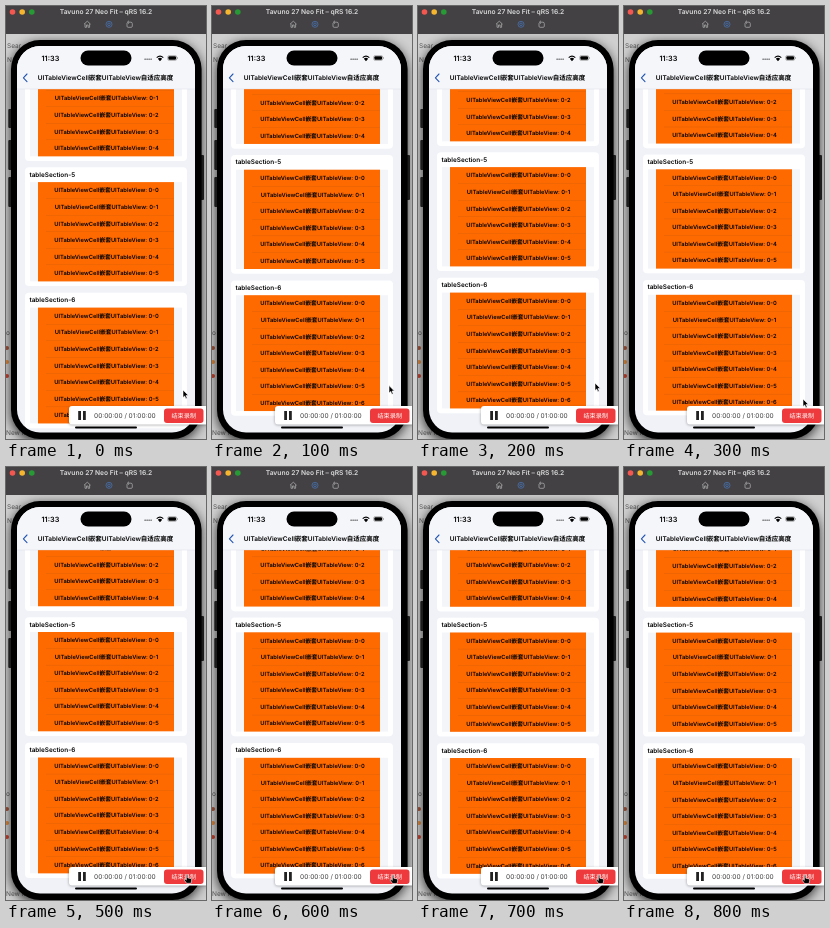
Recreate the animation shown at these times as an HTML page. Size 200 px wide and 433 px high, loop 0.9 s.

```html
<!DOCTYPE html>
<html lang="zh-CN">
<head>
<meta charset="utf-8">
<title>Nested table</title>
<style>
html, body { margin: 0; width: 100%; height: 100%; overflow: hidden; background: #d3d3d3; }
svg { display: block; width: 100%; height: 100%; }
text { font: 600 5.75px Inter, "Noto Sans CJK SC", "Noto Sans CJK", sans-serif; text-rendering: geometricPrecision; }
.mid { text-anchor: middle; }
.side text { font-weight: 400; font-size: 6.5px; fill: #555; }
</style>
</head>
<body>
<svg viewBox="0 0 200 433" preserveAspectRatio="none">
  <defs>
    <clipPath id="screen"><rect x="11" y="40" width="178" height="386.5" rx="23"/></clipPath>
    <clipPath id="list"><rect x="10" y="83" width="180" height="344"/></clipPath>
    <filter id="soft" x="-20%" y="-20%" width="140%" height="140%"><feGaussianBlur stdDeviation="6"/></filter>
    <filter id="glow" x="-20%" y="-50%" width="140%" height="200%"><feGaussianBlur stdDeviation="1.6"/></filter>
  </defs>

  <rect width="200" height="433" fill="#cfcfcf"/>
  <g class="side">
    <text x="1" y="41.5">Sear</text>
    <text x="1" y="56">N</text>
    <text x="0" y="329">o</text>
    <text x="0" y="429">New m</text>
    <circle cx="1" cy="342" r="2" fill="#a5553a"/>
    <circle cx="1" cy="356" r="2" fill="#e08a3c"/>
    <circle cx="1" cy="370" r="2" fill="#c9432f"/>
  </g>
  <rect x="5" y="37" width="190" height="399" rx="29" opacity=".8" filter="url(#soft)"/>

  <rect width="200" height="28" fill="#434144"/>
  <circle cx="6.5" cy="6" r="2.8" fill="#f4574f"/>
  <circle cx="16.2" cy="6" r="2.8" fill="#f5b52e"/>
  <circle cx="25.8" cy="6" r="2.8" fill="#279a35"/>
  <text class="mid" x="100" y="8.2" fill="#dcdcdc" style="font-size:6.7px">Tavuno 27 Neo Fit – qRS 16.2</text>
  <g fill="none" stroke="#b4b4b4" stroke-width=".7">
    <path d="M78 18.2 81.3 15.2 84.6 18.2M79 17.6V21.3H80.5V19H82.1V21.3H83.6V17.6"/>
    <g stroke="#4878bd"><circle cx="103" cy="18.3" r="3"/><circle cx="103" cy="18.3" r="1.3"/></g>
    <path d="M121 17V20.2Q121 21.3 122.1 21.3H125.2Q126.3 21.3 126.3 20.2V17.6Q126.3 16.2 124.8 16.2H121.6M123 14.7 121.4 16.2 123 17.7"/>
  </g>

  <g fill="#1c1c1c">
    <rect x="2.3" y="103" width="4" height="19" rx="1"/>
    <rect x="2.3" y="134" width="4" height="30" rx="1"/>
    <rect x="2.3" y="171" width="4" height="30" rx="1"/>
    <rect x="194" y="149" width="4" height="45" rx="1"/>
  </g>
  <rect x="5" y="34" width="190.6" height="399" rx="29"/>

  <g clip-path="url(#screen)">
    <rect x="10" y="39" width="180" height="389" fill="#f0f2f8"/>
    <g clip-path="url(#list)"><g id="cards"></g></g>
    <rect x="10" y="39" width="180" height="44" fill="#f5f6fa"/>
    <path d="M10 83H190" stroke="#d5d7dd" stroke-width=".4"/>
    <text class="mid" x="44.4" y="55.2" style="font-size:7.3px">11:33</text>
    <rect x="74.5" y="44.5" width="51" height="15" rx="7.5"/>
    <g id="signal"></g>
    <path d="M150.3 51.2Q154 47.8 157.7 51.2L156.9 52.1Q154 49.5 151.1 52.1ZM151.8 52.8Q154 50.9 156.2 52.8L154 55.2Z"/>
    <rect x="161.7" y="49.6" width="9" height="4.8" rx="1.4" fill="none" stroke="#777" stroke-width=".5"/>
    <rect x="162.4" y="50.3" width="7.6" height="3.4" rx=".9"/>
    <rect x="171.3" y="51.2" width=".6" height="1.6" fill="#777"/>
    <path d="M21 68 17.4 71.8 21 75.6" fill="none" stroke="#2456b4" stroke-width="1.1" stroke-linecap="round" stroke-linejoin="round"/>
    <text class="mid" x="99.6" y="74.2" style="font-size:6.5px">UITableViewCell嵌套UITableView自适应高度</text>
    <rect x="69" y="420.4" width="62" height="2" rx="1"/>
  </g>

  <rect x="63" y="401" width="140" height="18" rx="3" opacity=".35" filter="url(#glow)"/>
  <rect x="63" y="400" width="140" height="18.5" rx="3" fill="#fff"/>
  <path d="M72.2 405H75V414H72.2ZM77 405H79.8V414H77Z" fill="#222"/>
  <text x="88" y="411.6" fill="#444" style="font-size:6.55px;font-weight:400">00:00:00 / 01:00:00</text>
  <rect x="158" y="402.5" width="39.5" height="14.5" rx="3" fill="#ee3a3c"/>
  <text class="mid" x="177.8" y="411.8" fill="#fff" style="font-size:6.2px;font-weight:500">结束录制</text>

  <g id="cursor" stroke="#fff" stroke-width=".6" stroke-linejoin="round">
    <path id="arrow" d="M0 0V7.6L1.7 6 2.9 8.8 4.2 8.2 3 5.5H5.4Z"/>
    <path id="hand" d="M0 .7Q.8-.5 1.5.7V3.4L4.6 4.1Q5.5 4.4 5.4 5.4L4.8 8.8H.3L-2 5.6Q-2.2 4.5-1 4.8L0 5.6Z"/>
  </g>
</svg>
<script>
const $ = id => document.getElementById(id);
const ROW = 16.55, STEP = 100, LOOP = 900;

const box = (x, y, w, h, fill, rx = 0) =>
  `<rect x="${x}" y="${y}" width="${w}" height="${h}" rx="${rx}" fill="${fill}"/>`;

function card(section, rows, top) {
  const first = top + 14.8, height = rows * ROW;
  let out = box(19, top, 162, height + 19.5, '#fff', 4) +
    box(24, first, 152, height, '#f4f5f9') + box(32, first, 136, height, '#ff6a00') +
    `<text x="23.4" y="${top + 9.4}" style="font-size:6.4px">tableSection-${section}</text>`;
  for (let i = 0; i < rows; i++) {
    const y = first + i * ROW;
    if (i) out += box(40, y - .15, 128, .3, '#c85a0c');
    out += `<text class="mid" x="100.5" y="${y + 10.3}">UITableViewCell嵌套UITableView: 0-${i}</text>`;
  }
  return out;
}

$('cards').innerHTML = card(4, 5, 52.8) + card(5, 6, 161.3) + card(6, 7, 286.8);
$('signal').innerHTML = [0, 1, 2, 3].map(i => box(138.5 + i * 2, 52.5, 1.2, 1.2, '#222', .5)).join('');

// The list overshoots, then settles back
const scroll = [0, -12.4, -15, -12.8, -11.6, -11.1, -10.8, -10.6, -10.5];
const pointer = [[177, 384], [177, 379.5], [177, 377], [179, 393], [180.3, 406.5], [180.3, 407.5], [180.3, 407.8]];

function draw(ms) {
  const step = Math.floor(ms % LOOP / STEP);
  const [x, y] = pointer[Math.min(step, pointer.length - 1)];
  const pressing = step > 3;
  $('cards').setAttribute('transform', `translate(0 ${scroll[step]})`);
  $('cursor').setAttribute('transform', `translate(${x} ${y})`);
  $('arrow').style.display = pressing ? 'none' : '';
  $('hand').style.display = pressing ? '' : 'none';
}

const start = performance.now();
function tick() {
  draw(performance.now() - start);
  requestAnimationFrame(tick);
}
tick();
</script>
</body>
</html>
```
